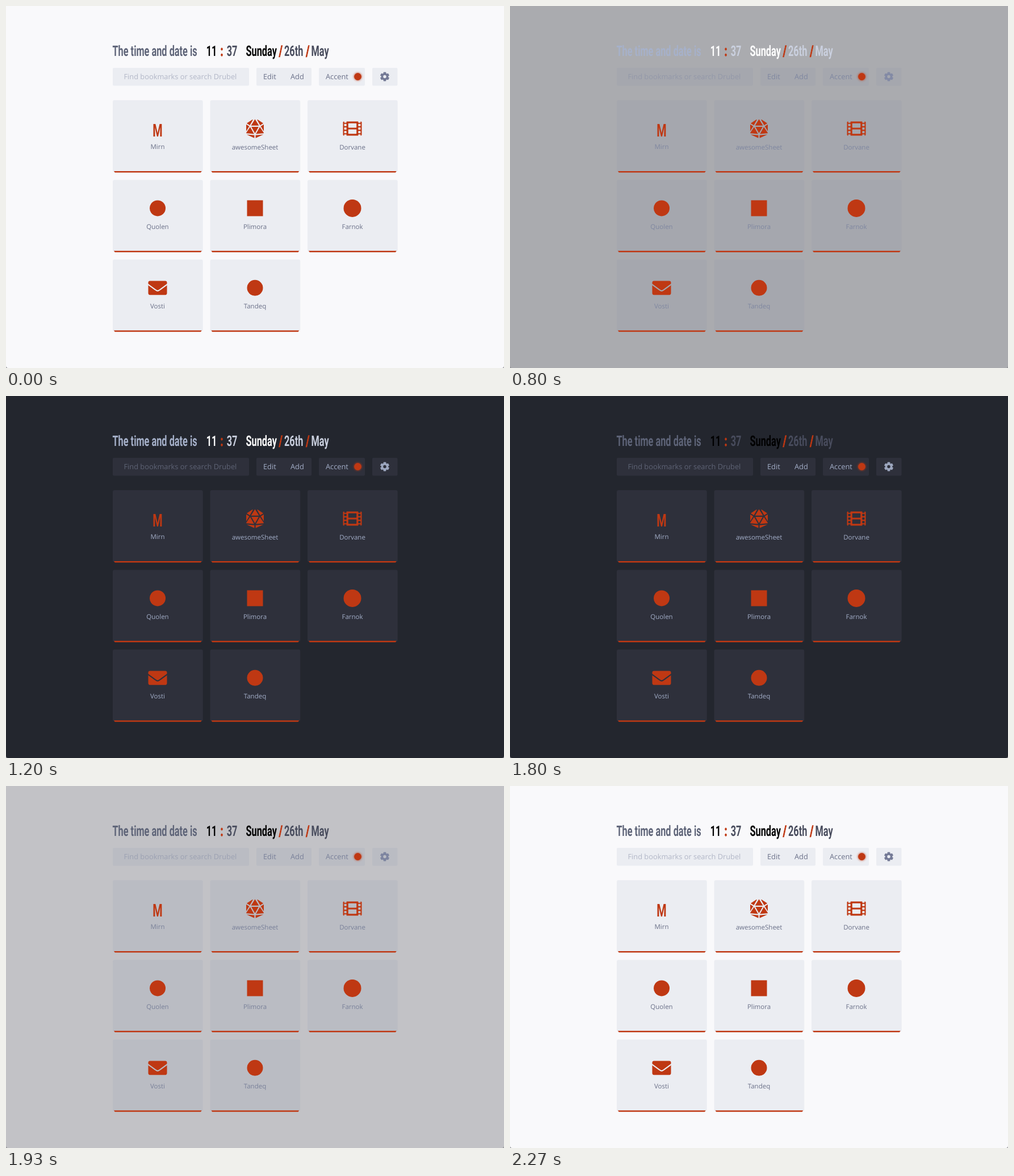
Write an HTML page that moves like this. It is 877 px wide and 638 px high and loops after 2340 ms.

```html
<!DOCTYPE html>
<html lang="en">
<head>
<meta charset="utf-8">
<title>Bookmarks</title>
<style>
  html, body { margin: 0; height: 100%; overflow: hidden; }
  svg { display: block; width: 877px; height: 638px; background: var(--page);
        font-family: "Open Sans", sans-serif; text-rendering: geometricPrecision; }
  .panel { fill: var(--panel); }
  .cut { fill: none; stroke: var(--panel); }
  .accent { fill: #bf3813; }
  .text { fill: var(--text); font-size: 12.8px; }
  .label { fill: var(--text); font-size: 11.5px; text-anchor: middle; }
  .hint { fill: var(--hint); }
  .icon { fill: var(--icon); }
  .head { font: 700 25.5px Roboto, sans-serif; }
  .letter { font-size: 31px; text-anchor: middle; }
  .soft { fill: var(--soft); }
  .strong { fill: var(--strong); }
  .medium { fill: var(--medium); }
  .mid { text-anchor: middle; }
  .mark { stroke: #bf3813; stroke-width: 1.2; }
</style>
</head>
<body>
<svg viewBox="0 0 877 638">
  <defs>
    <filter id="glow" x="-50%" y="-50%" width="200%" height="200%"><feGaussianBlur stdDeviation="1.5"/></filter>
  </defs>
  <path d="M0 634v4h4a4 4 0 0 1-4-4M877 634v4h-4a4 4 0 0 0 4-4" fill="#8b8c90"/>
  <g id="heading"></g>

  <g class="panel">
    <rect x="188" y="109" width="240" height="31.5" rx="2"/>
    <rect x="441" y="109" width="97" height="31.5" rx="2"/>
    <rect x="551" y="109" width="81" height="31.5" rx="2"/>
    <rect x="645" y="109" width="44.5" height="31.5" rx="2"/>
  </g>
  <g class="text">
    <text class="hint" x="207.5" y="129">Find bookmarks or search Drubel</text>
    <text x="453" y="129">Edit</text>
    <text x="501" y="129">Add</text>
    <text x="563" y="129">Accent</text>
  </g>
  <circle class="accent" cx="619.5" cy="124.5" r="7.6" opacity=".5" filter="url(#glow)"/>
  <circle class="accent" cx="619.5" cy="124.5" r="6.4"/>
  <g class="icon" transform="translate(667 124.5)">
    <circle r="6.2"/>
    <rect id="tooth" x="-2.4" y="-8.1" width="4.8" height="16.2" rx="1"/>
    <use href="#tooth" transform="rotate(60)"/>
    <use href="#tooth" transform="rotate(120)"/>
    <circle class="panel" r="2.7"/>
  </g>

  <g id="tiles"></g>
</svg>
<script>
const FPS = 15, LOOP = 2340, FADE = 300, TO_DARK = 730, TO_LIGHT = 1800;

// Fading colours and heading colours, each as [light, dark]
const fading = {
  page: [[249, 249, 251], [35, 38, 46]],
  panel: [[235, 237, 242], [46, 48, 59]],
  text: [[106, 112, 136], [163, 174, 200]],
  hint: [[178, 183, 199], [94, 99, 117]],
  icon: [[116, 122, 150], [156, 166, 190]]
};
const instant = {
  soft: ['#5e6478', '#a6b1ca'],
  strong: ['#000', '#fff'],
  medium: ['#484c5d', '#cad0df']
};

// Condensed heading face
const condensed = (x, y, cls, str) =>
  `<text class="head ${cls}" transform="translate(${x} ${y}) scale(.64 1)">${str}</text>`;

document.getElementById('heading').innerHTML = [
  [187.5, 'soft', 'The time and date is'],
  [362, 'strong mid', '11'], [380, 'accent mark mid', ':'], [398, 'medium mid', '37'],
  [422.5, 'strong', 'Sunday'], [483.7, 'accent mark mid', '/'],
  [490, 'medium', '26th'], [531.3, 'accent mark mid', '/'], [537.5, 'medium', 'May']
].map(([x, cls, str]) => condensed(x, 88, cls, str)).join('');

const disc = r => `<circle class="accent" r="${r}"/>`;
const square = s => `<rect class="accent" x="${-s / 2}" y="${-s / 2}" width="${s}" height="${s}"/>`;
const hole = (x, y, w, h) => `<rect class="panel" x="${x}" y="${y}" width="${w}" height="${h}" rx="12"/>`;
// Icons are drawn on a 512 unit grid
const glyph = (cx, shapes) => `<g transform="scale(.0645) translate(${-cx} -256)">${shapes}</g>`;

const dieSide = 'M107 215L0 373L4 383L215 405ZM7 318L83 193L0 143V320ZM11 420L222 515L224 438ZM99 166L182 18L172 9L13 112Z';
const die = glyph(240, `<path class="accent" d="M240 0L131 176H349ZM140 208H340L240 384Z${dieSide}"/>
  <path class="accent" transform="translate(480) scale(-1 1)" d="${dieSide}"/>`);

const film = glyph(256, `<rect class="accent" y="64" width="512" height="384" rx="24"/>
  ${[32, 128, 224, 320, 416].map(y => hole(32, y, 64, 64) + hole(416, y, 64, 64)).join('')}
  ${hole(144, 112, 224, 120)}${hole(144, 280, 224, 120)}`);

const envelope = glyph(256, `<rect class="accent" y="64" width="512" height="384" rx="48"/>
  <path class="cut" stroke-width="32" d="M-12 156L173 291Q236 338 256 336Q276 338 339 291L524 156"/>`);

const tiles = [
  ['Mirn', condensed(0, 14, 'accent letter', 'M')], ['awesomeSheet', die], ['Dorvane', film],
  ['Quolen', disc(14)], ['Plimora', square(28)], ['Farnok', disc(15.5)],
  ['Vosti', envelope], ['Tandeq', disc(14)]
];
document.getElementById('tiles').innerHTML = tiles.map(([name, icon], i) => `
  <g transform="translate(${188 + i % 3 * 171.5} ${166 + Math.floor(i / 3) * 140.4})">
    <rect class="panel" width="158.7" height="126.5" rx="3"/>
    <path class="accent" d="M2 125H156.7L155 127.5H3.7Z"/>
    <g transform="translate(79 50)">${icon}</g>
    <text class="label" x="79" y="${i ? 86.7 : 85.8}">${name}</text>
  </g>`).join('');

// CSS "ease": cubic-bezier(.25, .1, .25, 1)
function ease(x) {
  if (x <= 0) return 0;
  if (x >= 1) return 1;
  const bezier = (a, b, s) => 3 * (1 - s) ** 2 * s * a + 3 * (1 - s) * s * s * b + s ** 3;
  let lo = 0, hi = 1;
  for (let i = 0; i < 20; i++) {
    const s = (lo + hi) / 2;
    if (bezier(.25, .25, s) < x) lo = s; else hi = s;
  }
  return bezier(.1, 1, lo);
}

const root = document.documentElement.style;

function draw(now) {
  const t = Math.floor((now % LOOP + 4) * FPS / 1000) * 1000 / FPS;
  const dark = ease((t - TO_DARK) / FADE) - ease((t - TO_LIGHT) / FADE);
  const headDark = t >= TO_DARK && t < TO_LIGHT ? 1 : 0;
  for (const [name, [from, to]] of Object.entries(fading))
    root.setProperty('--' + name, `rgb(${from.map((c, i) => Math.round(c + (to[i] - c) * dark))})`);
  for (const [name, pair] of Object.entries(instant))
    root.setProperty('--' + name, pair[headDark]);
}

function tick() {
  draw(performance.now());
  requestAnimationFrame(tick);
}
tick();
</script>
</body>
</html>
```
